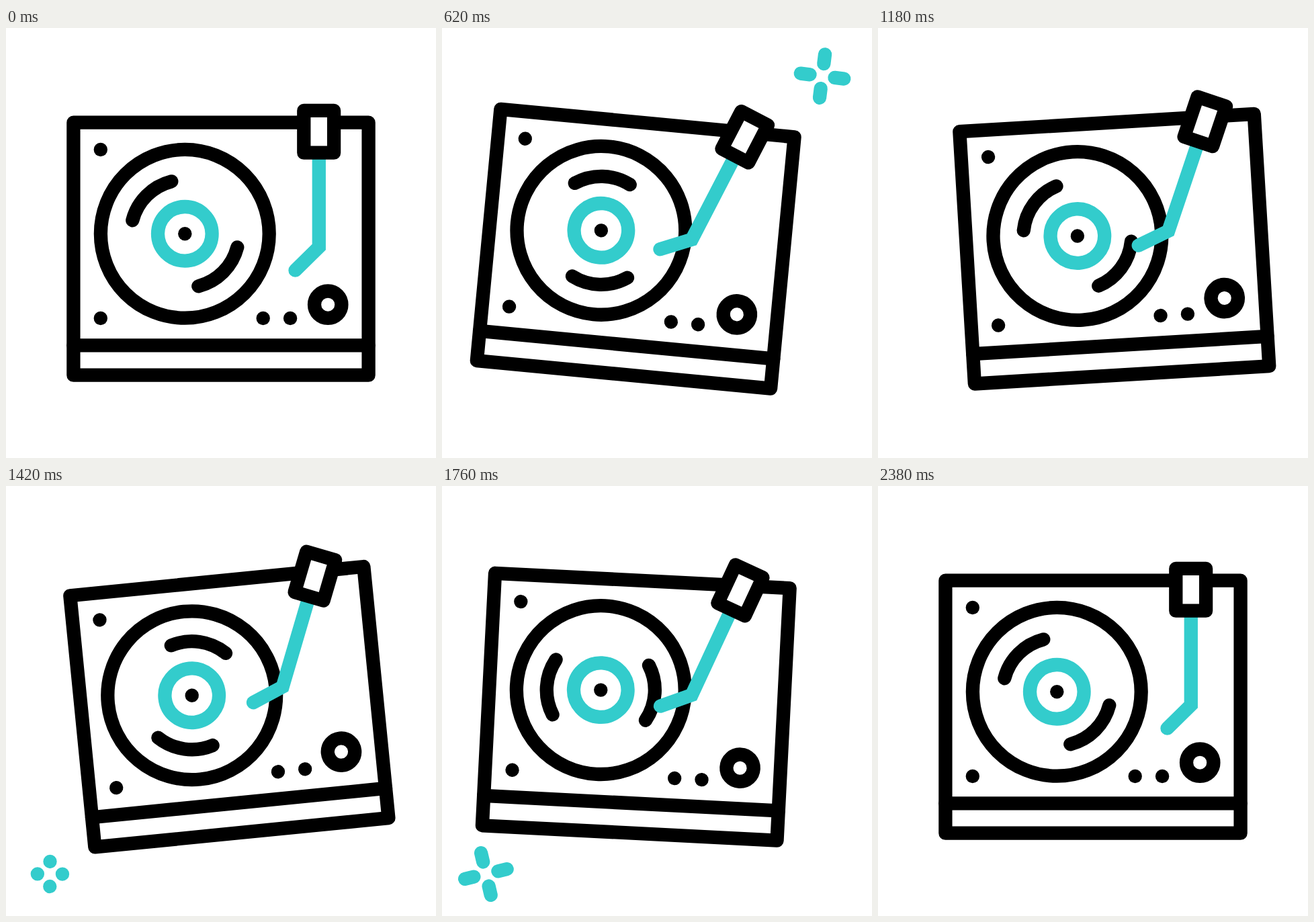
An HTML page for the animation above (2400 ms loop, 640 by 640 pixels).

```html
<!DOCTYPE html>
<html lang="en">
<head>
<meta charset="utf-8">
<title>Turntable</title>
<style>
  html, body { margin: 0; width: 100%; height: 100%; overflow: hidden; background: #fff; }
  svg { display: block; width: 100vw; height: 100vh; }
  .line { fill: none; stroke: #000; stroke-width: 20.3; stroke-linecap: round; stroke-linejoin: round; }
  .teal { stroke: #33cccc; }
</style>
</head>
<body>
<svg viewBox="0 0 640 640">
  <g id="deck">
    <g class="line">
      <rect x="100.4" y="140.7" width="439.2" height="376"/>
      <path d="M100.4 472.3H539.6"/>
      <circle cx="266.3" cy="306.3" r="125.4"/>
      <circle cx="479.2" cy="411.7" r="20.2"/>
    </g>
    <g>
      <circle cx="140.8" cy="181" r="10.2"/>
      <circle cx="140.8" cy="432" r="10.2"/>
      <circle cx="382.7" cy="432" r="10.2"/>
      <circle cx="423.1" cy="432" r="10.2"/>
      <circle cx="266.3" cy="306.3" r="10.2"/>
    </g>
    <circle class="line teal" cx="266.3" cy="306.3" r="40.3"/>
    <path id="grooves" class="line" d="M188.3 286.3A80.5 80.5 0 0 1 246.3 228.3M344.3 326.3A80.5 80.5 0 0 1 286.3 384.3"/>
    <g id="arm">
      <path class="line teal" style="stroke-linejoin:miter" d="M465.8 186V326L430.5 360.7"/>
      <rect class="line" style="fill:#fff" x="443.3" y="122.9" width="44.8" height="62.8"/>
    </g>
  </g>
  <path id="spark1" class="line teal"/>
  <path id="spark2" class="line teal"/>
</svg>
<script>
const LOOP = 2400;
const el = id => document.getElementById(id);
const deck = el('deck'), grooves = el('grooves'), arm = el('arm');

// Eased progress from time a to time b
function ease(t, a, b) {
  const s = Math.min(1, Math.max(0, (t - a) / (b - a)));
  return s * s * (3 - 2 * s);
}

// Value at t along [time, value] keys
function track(t, keys) {
  let v = keys[0][1];
  for (let i = 1; i < keys.length; i++) {
    v += (keys[i][1] - keys[i - 1][1]) * ease(t, keys[i - 1][0], keys[i][0]);
  }
  return v;
}

const SHIFT = [[40, 0], [600, -32], [1200, 32], [1800, -32], [2340, 0]];
const TILT = [[40, 0], [760, 6], [1360, -6], [1960, 6], [2360, 0]];
const ARM = [[40, 0], [400, 22], [2000, 22], [2380, 0]];

// Four rays that grow outward, then shrink toward their outer ends
function spark(node, t, start, x, y) {
  const age = t - start;
  const on = age > 0 && age < 800;
  node.style.display = on ? '' : 'none';
  if (!on) return;
  const inner = 18.5 + 14 * ease(age, 400, 800);
  const outer = Math.max(inner + 0.01, 18.5 + 14 * ease(age, 0, 400));
  const turn = Math.PI * ease(age, 0, 800);
  let d = '';
  for (let i = 0; i < 4; i++) {
    const a = turn + i * Math.PI / 2;
    const at = r => (x + r * Math.cos(a)).toFixed(3) + ' ' + (y + r * Math.sin(a)).toFixed(3);
    d += 'M' + at(inner) + 'L' + at(outer);
  }
  node.setAttribute('d', d);
}

function draw(t) {
  deck.setAttribute('transform', `translate(${track(t, SHIFT)} 0) rotate(${track(t, TILT)} 320 328.6)`);
  grooves.setAttribute('transform', `rotate(${360 * ease(t, 200, 2200)} 266.3 306.3)`);
  arm.setAttribute('transform', `rotate(${track(t, ARM)} 483 152)`);
  spark(el('spark1'), t, 200, 566, 71.6);
  spark(el('spark2'), t, 1400, 65.4, 577.5);
}

function tick() {
  draw(performance.now() % LOOP);
  requestAnimationFrame(tick);
}
tick();
</script>
</body>
</html>
```
